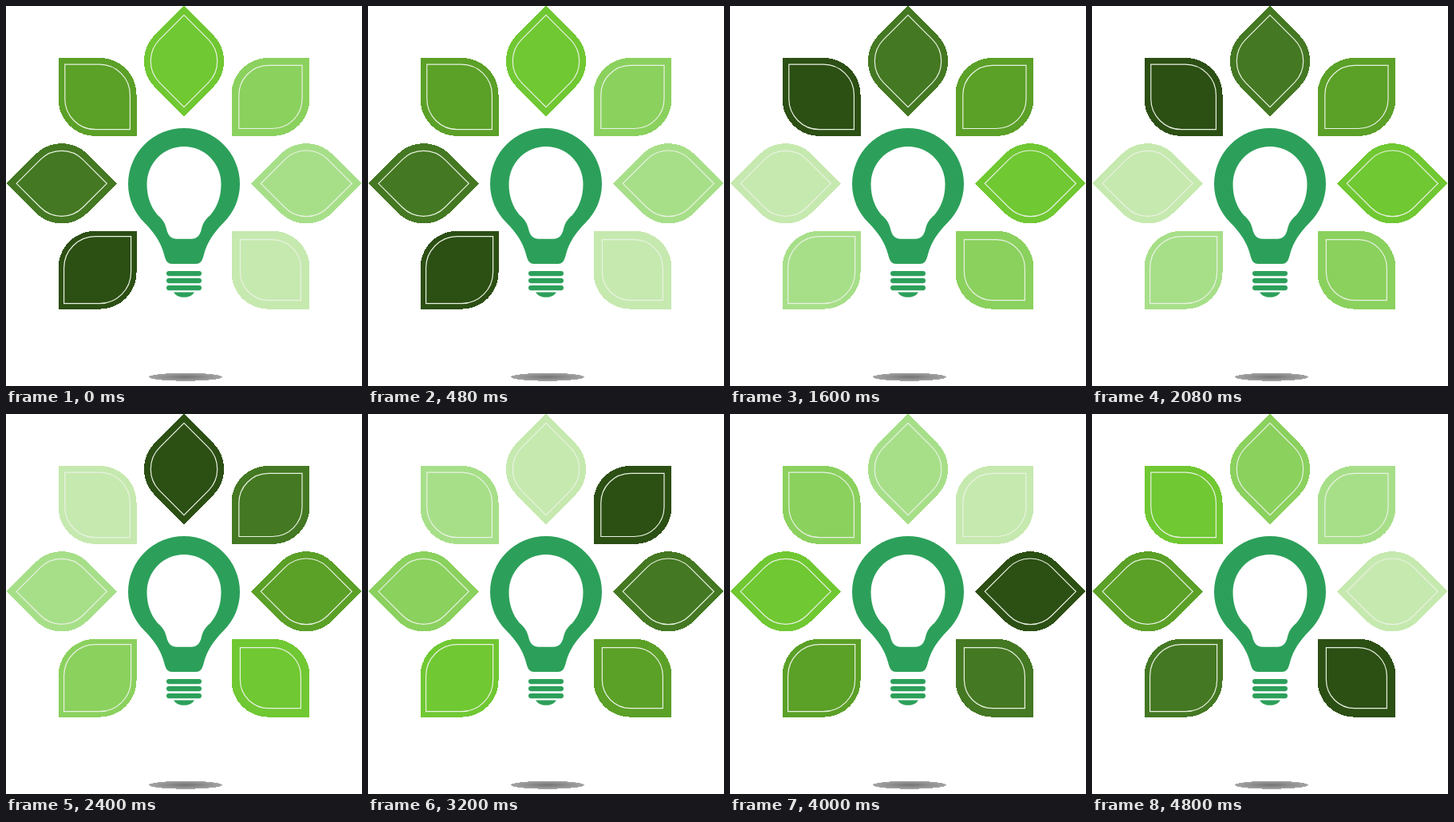
Animation of 446x476 px, one loop 5.6 s. Source, as an HTML page:

```html
<!DOCTYPE html>
<html lang="en">
<head>
<meta charset="utf-8">
<title>Green idea</title>
<style>
  html, body { margin: 0; height: 100%; overflow: hidden; background: #fff; }
  svg { display: block; }
</style>
</head>
<body>
<svg width="446" height="476" viewBox="0 0 446 476">
  <defs>
    <radialGradient id="shade">
      <stop offset="0" stop-color="#747474"/>
      <stop offset="1" stop-color="#a4a4a4"/>
    </radialGradient>
  </defs>
  <g id="leaves" transform="translate(223 222.3)"></g>
  <g fill="#2ca05a">
    <path fill-rule="evenodd" d="M153 223A70 70 0 0 1 293 223C293 242 285 259 273 271C260 284 252 296 248 311C246 319 244 323 238 323H208C202 323 200 319 198 311C194 296 186 284 173 271C161 259 153 242 153 223Z
      M176.5 223A46.5 47 0 0 1 269.5 223C269.5 239 264.5 252 256 262C250 267 247 271 245 279C243 288 239 291.7 232 291.7H214C207 291.7 203 288 201 279C199 271 196 267 190 262C181.5 252 176.5 239 176.5 223Z"/>
    <rect x="201" y="332" width="44" height="6.2" rx="3.1"/>
    <rect x="201" y="341" width="44" height="6.2" rx="3.1"/>
    <rect x="201" y="350" width="44" height="6.2" rx="3.1"/>
    <path d="M210 358.5H236C233 363 229 364.8 223 364.8S213 363 210 358.5Z"/>
  </g>
  <ellipse cx="225" cy="464.7" rx="46" ry="5" fill="url(#shade)" shape-rendering="crispEdges"/>
</svg>
<script>
const STEP = 800;
const COLORS = ['#2c4f14', '#447822', '#5ba027', '#70c832', '#8bd15e', '#a7df89', '#c6e9af'];
const LINE_SIZES = [42, 40, 40.8, 40.7, 39.6, 40.3, 38];
const group = document.getElementById('leaves');

// Square of half-width h with two opposite corners rounded by r.
const leafPath = (h, r) =>
  `M${-h} ${-h}H${h - r}A${r} ${r} 0 0 1 ${h} ${r - h}V${h}H${r - h}A${r} ${r} 0 0 1 ${-h} ${h - r}Z`;

function addPath(parent, attributes) {
  const path = document.createElementNS('http://www.w3.org/2000/svg', 'path');
  for (const name in attributes) path.setAttribute(name, attributes[name]);
  return parent.appendChild(path);
}

// Leaves run clockwise from the bottom left.
const leaves = LINE_SIZES.map((size, i) => {
  const transform = `rotate(${45 * (i - 2)}) translate(-108.4 -108.4)`;
  const leaf = addPath(group, { transform, d: leafPath(48.9, 46), 'shape-rendering': 'crispEdges' });
  addPath(group, { transform, d: leafPath(size, size * 0.94), fill: 'none', stroke: '#e9f2e2', 'stroke-width': 1.2 });
  return leaf;
});

function draw(now) {
  const step = Math.floor(now / STEP) % COLORS.length;
  leaves.forEach((leaf, i) =>
    leaf.setAttribute('fill', COLORS[(i - step + COLORS.length) % COLORS.length]));
  requestAnimationFrame(draw);
}
draw(0);
</script>
</body>
</html>
```
